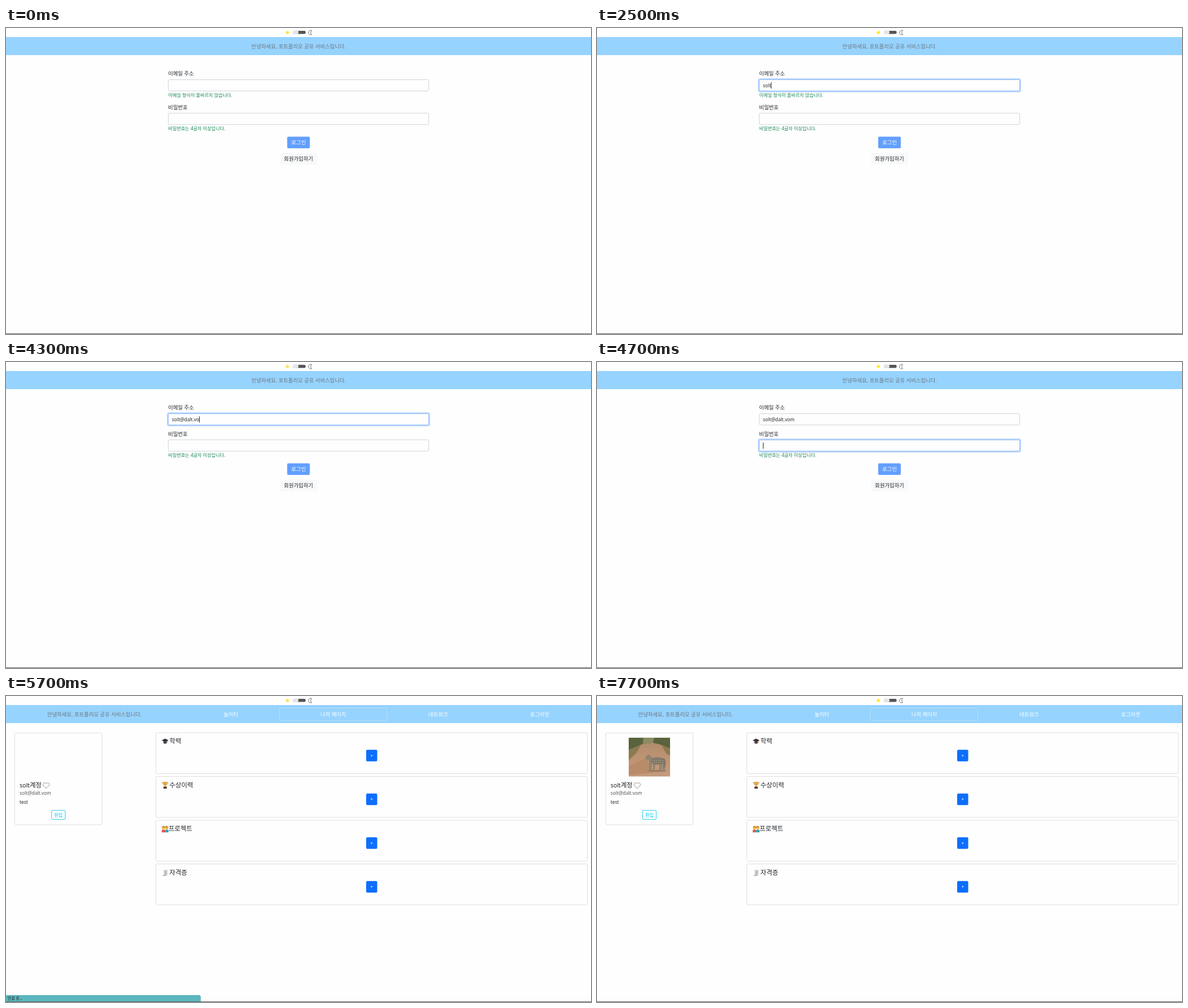
These frames come from a looping animation (1033 px wide and 542 px high, 7840 ms). An HTML page:

```html
<!DOCTYPE html>
<html lang="ko">
<head>
<meta charset="utf-8">
<title>포트폴리오 공유 서비스</title>
<style>
  html, body { margin: 0; width: 100%; height: 100%; overflow: hidden; background: #fefefe; }
  svg { display: block; }
  text { font: 9.33px "Noto Sans", "Noto Sans CJK KR", sans-serif; fill: #212529; white-space: pre; }
  .mid { text-anchor: middle; }
  .greet { fill: #6c757d; }
  .white { fill: #fff; }
  .hint { font-size: 8.12px; fill: #198754; }
  .latin { font-size: 8.3px; }
  .title { font-size: 11.4px; font-weight: 500; }
  .title .name { font-size: 10.5px; }
  .dots { font-size: 9.4px; }
  .box { fill: #fefefe; stroke: #ced4da; }
  .glow { fill: none; stroke: #0d6efd; stroke-opacity: .25; stroke-width: 2; }
  .ring { fill: none; stroke: #86b7fe; }
  .card { fill: none; stroke: #dfdfdf; }
  .caret { fill: #222; }
</style>
</head>
<body>
<svg width="1033" height="542" viewBox="0 0 1033 542">
  <defs>
    <linearGradient id="road" x2="0" y2="1">
      <stop offset="0" stop-color="#a88a68"/>
      <stop offset=".45" stop-color="#bd9272"/>
      <stop offset="1" stop-color="#c39a7c"/>
    </linearGradient>
    <clipPath id="frame"><rect width="73" height="69"/></clipPath>
  </defs>

  <!-- theme switch -->
  <g stroke="#ffe98a" stroke-width="1">
    <path d="M497 4v8M493 8h8M494.2 5.2l5.6 5.6M499.8 5.2l-5.6 5.6"/>
    <circle cx="497" cy="8" r="2.3" fill="#ffe51f" stroke="none"/>
  </g>
  <rect x="507" y="5" width="22" height="5.5" rx="2" fill="#555"/>
  <rect x="507" y="4" width="9.5" height="7" rx="3.5" fill="#e6e6e6"/>
  <path d="M540 4.6A4 4 0 1 0 540 11.6A4.2 4.2 0 0 1 540 4.6Z" fill="none" stroke="#555" stroke-width=".8"/>
  <rect y="16" width="1033" height="32" fill="#96d3ff"/>

  <g id="login">
    <text class="greet mid" x="516.7" y="35.6">안녕하세요, 포트폴리오 공유 서비스입니다.</text>
    <text x="286.3" y="84">이메일 주소</text>
    <g id="mail" transform="translate(286 91)"></g>
    <text id="mailHint" class="hint" x="286.5" y="121.7">이메일 형식이 올바르지 않습니다.</text>
    <g id="lower">
      <text x="286.3" y="143.5">비밀번호</text>
      <g id="pass" transform="translate(286 150.4)"></g>
      <text id="passHint" class="hint" x="286.5" y="181">비밀번호는 4글자 이상입니다.</text>
      <g id="buttons">
        <rect id="submit" x="496.5" y="192.5" width="40" height="20.5" rx="2"/>
        <text class="white mid" x="516.6" y="206.2">로그인</text>
        <rect x="484" y="221.5" width="65.5" height="20.5" rx="2" fill="#f8f9fa"/>
        <text class="mid" x="516.6" y="235.3">회원가입하기</text>
      </g>
    </g>
  </g>

  <g id="home">
    <text class="greet" x="72.8" y="35.6">안녕하세요, 포트폴리오 공유 서비스입니다.</text>
    <rect x="482.5" y="21.5" width="190" height="22" rx="2" fill="none" stroke="#b8dff8"/>
    <g class="nav">
      <text class="white mid" x="397" y="35.6">놀이터</text>
      <text class="white mid" x="578" y="35.6">나의 페이지</text>
      <text class="white mid" x="763" y="35.6">네트워크</text>
      <text class="white mid" x="942.5" y="35.6">로그아웃</text>
    </g>

    <rect class="card" x="15.5" y="65.5" width="154" height="162.5" rx="2"/>
    <g id="photo" transform="translate(56 73.7)" clip-path="url(#frame)">
      <rect width="73" height="69" fill="url(#road)"/>
      <path d="M0 0H73V19L55 12L42 9L25 11L0 22Z" fill="#59633c"/>
      <path d="M26 0H45L43 9L25 11Z" fill="#8d8b62"/>
      <path d="M0 22L22 12L13 28L0 40ZM73 19L58 13L66 28L73 32Z" fill="#8c7a50"/>
      <path d="M0 51L30 36L45 62L0 66Z" fill="#b98b69"/>
      <ellipse cx="50" cy="59" rx="17" ry="1.5" fill="#98745a"/>
      <g fill="#8f8471">
        <ellipse cx="50" cy="41" rx="14" ry="7"/>
        <circle cx="35" cy="35.5" r="5"/>
        <path d="M36 41h5l-1 18h-4ZM43 44h4l-1 14h-3ZM54 44h5l-1 14h-4ZM59 40h5v19h-4Z"/>
        <path d="M62 38q5 6 0 15" fill="none" stroke="#777063" stroke-width="2"/>
      </g>
      <path d="M41 38h22M40 42h23M43 46h18" stroke="#5c554a" stroke-width="1.4" stroke-dasharray="1.4 2"/>
    </g>
    <text class="title" x="24" y="161.7"><tspan class="name">solt</tspan>계정</text>
    <path d="M71 163.6C67.5 160.6 65.5 158.9 65.5 156.6C65.5 153.4 69.4 152.7 71 155.4C72.6 152.7 76.5 153.4 76.5 156.6C76.5 158.9 74.5 160.6 71 163.6Z" fill="none" stroke="#777" stroke-width=".8"/>
    <text class="latin" x="24" y="175" style="fill:#50565c">solt@dalt.vom</text>
    <text class="latin" x="24" y="190.6">test</text>
    <rect x="80.5" y="202.5" width="24" height="16" rx="1.5" fill="none" stroke="#2dcff0"/>
    <text class="mid" x="92.6" y="213.7" style="font-size:8.12px;fill:#0dcaf0">편집</text>

    <g id="cards"></g>

    <g id="status">
      <path d="M0 530H341Q343.5 530 343.5 532.5V542H0Z" fill="#5bb8bf"/>
      <path d="M0 530.3H341Q343.3 530.3 343.3 532.5V542" fill="none" stroke="#4c9fa6" stroke-width=".7"/>
      <text x="2.5" y="538.3" style="font-size:7px">연결 중...</text>
    </g>
  </g>
  <rect y="541" width="1033" height="1" fill="#626062"/>
</svg>
<script>
const $ = id => document.getElementById(id);
const LOOP = 7840;
const clamp = v => Math.max(0, Math.min(1, v));
const show = (el, on) => { el.style.display = on ? "" : "none"; };
const shift = (el, y) => el.setAttribute("transform", `translate(0 ${y})`);

// text field with a fading focus ring and a caret after the typed text
function field(id, cls) {
  const g = $(id);
  g.innerHTML = `
    <rect class="box" x=".5" y=".5" width="460" height="20" rx="2"/>
    <g><rect class="glow" x="-1" y="-1" width="463" height="23" rx="3"/>
    <rect class="ring" x=".5" y=".5" width="460" height="20" rx="2"/></g>
    <text class="${cls}" x="7" y="13.7"></text>
    <rect class="caret" y="5.3" width="1" height="11"/>`;
  const ring = g.querySelector("g"), text = g.querySelector("text"), caret = g.querySelector(".caret");
  return (value, focus, active) => {
    if (text.textContent !== value) text.textContent = value;
    ring.style.opacity = focus;
    show(caret, active);
    if (active) caret.setAttribute("x", 7 + (value ? text.getComputedTextLength() : 0));
  };
}
const drawMail = field("mail", "latin");
const drawPass = field("pass", "dots");

const icons = [
  `<path d="M0 4L6 1L12 4L6 7.5Z" fill="#352c3b"/><path d="M3 6v3q3 2 6 0V6L6 7.6Z" fill="#44374b"/>
   <path d="M10.5 4.5v4" stroke="#d4a43a"/>`,
  `<path d="M3 0h6v3q0 3-3 4q-3-1-3-4Z" fill="#e5a53c"/><path d="M3 1H1q0 3 3 4M9 1h2q0 3-3 4" fill="none" stroke="#d08c30"/>
   <path d="M5.3 6h1.4v3H5.3Z" fill="#c98a2e"/><path d="M3 8.5h6V12H3Z" fill="#5a3b32"/>`,
  `<path d="M0 12V9q0-2 3-2t3 2v3Z" fill="#e2574c"/><path d="M6 12V9q0-2 3-2t3 2v3Z" fill="#35a3b5"/>
   <circle cx="3.2" cy="4" r="2.8" fill="#f2b43c"/><circle cx="8.8" cy="4" r="2.8" fill="#f2b43c"/>
   <path d="M.4 3.5a2.8 2.8 0 0 1 5.6 0a2.8 2.8 0 0 1 5.6 0L9 2L6 3.5L3 2Z" fill="#b57425"/>`,
  `<path d="M3.5 1H11q-1 1-1 2v7q0 1.5-1.5 1.5H2q1.5-.7 1.5-2Z" fill="#cfd1d4"/>
   <path d="M5 4h3.5M5 6h3.5M5 8h3.5" stroke="#999" stroke-width=".7"/><path d="M1.5 10h6v1.5H2Z" fill="#a9abad"/>`
];
$("cards").innerHTML = ["학력", "수상이력", "프로젝트", "자격증"].map((name, i) => `
  <g transform="translate(0 ${i * 77.5})">
    <rect class="card" x="264.5" y="65" width="762" height="72.5" rx="2"/>
    <g transform="translate(275 74.5)">${icons[i]}</g>
    <text class="title" x="${i === 2 ? 287 : 288.6}" y="84.3">${name}</text>
    <rect x="636" y="95.2" width="19.5" height="20.5" rx="2" fill="#0d6efd"/>
    <text class="white mid" x="645.8" y="108.6" style="font-size:8px">+</text>
  </g>`).join("");

const address = "solt@dalt.vom";
const mailKeys = [1800, 2200, 2400, 2500, 3100, 3300, 3400, 3500, 3600, 4100, 4200, 4300, 4400];
const passKeys = [5100, 5100, 5100, 5200];
const typed = (keys, t) => keys.filter(k => t >= k).length;

function draw(now) {
  const t = Math.floor(now % LOOP / 100) * 100;
  const home = t >= 5700;
  show($("login"), !home);
  show($("home"), home);
  if (home) {
    show($("photo"), t >= 6000);
    $("status").style.opacity = clamp((6200 - t) / 300);
  } else {
    const mailOk = t >= 4300, passOk = t >= 5200;
    const moved = clamp((t - 4550) / 150);
    drawMail(address.slice(0, typed(mailKeys, t)), clamp((t - 1050) / 150) * (1 - moved), t >= 1100 && t < 4600);
    drawPass("•".repeat(typed(passKeys, t)), moved, t >= 4600);
    show($("mailHint"), !mailOk);
    show($("passHint"), !passOk);
    shift($("lower"), mailOk ? -13 : 0);
    shift($("buttons"), passOk ? -13 : 0);
    $("submit").setAttribute("fill", passOk ? "#0d6efd" : "#629ffd");
  }
}
const start = performance.now();
(function frame() {
  draw(performance.now() - start);
  requestAnimationFrame(frame);
})();
</script>
</body>
</html>
```
